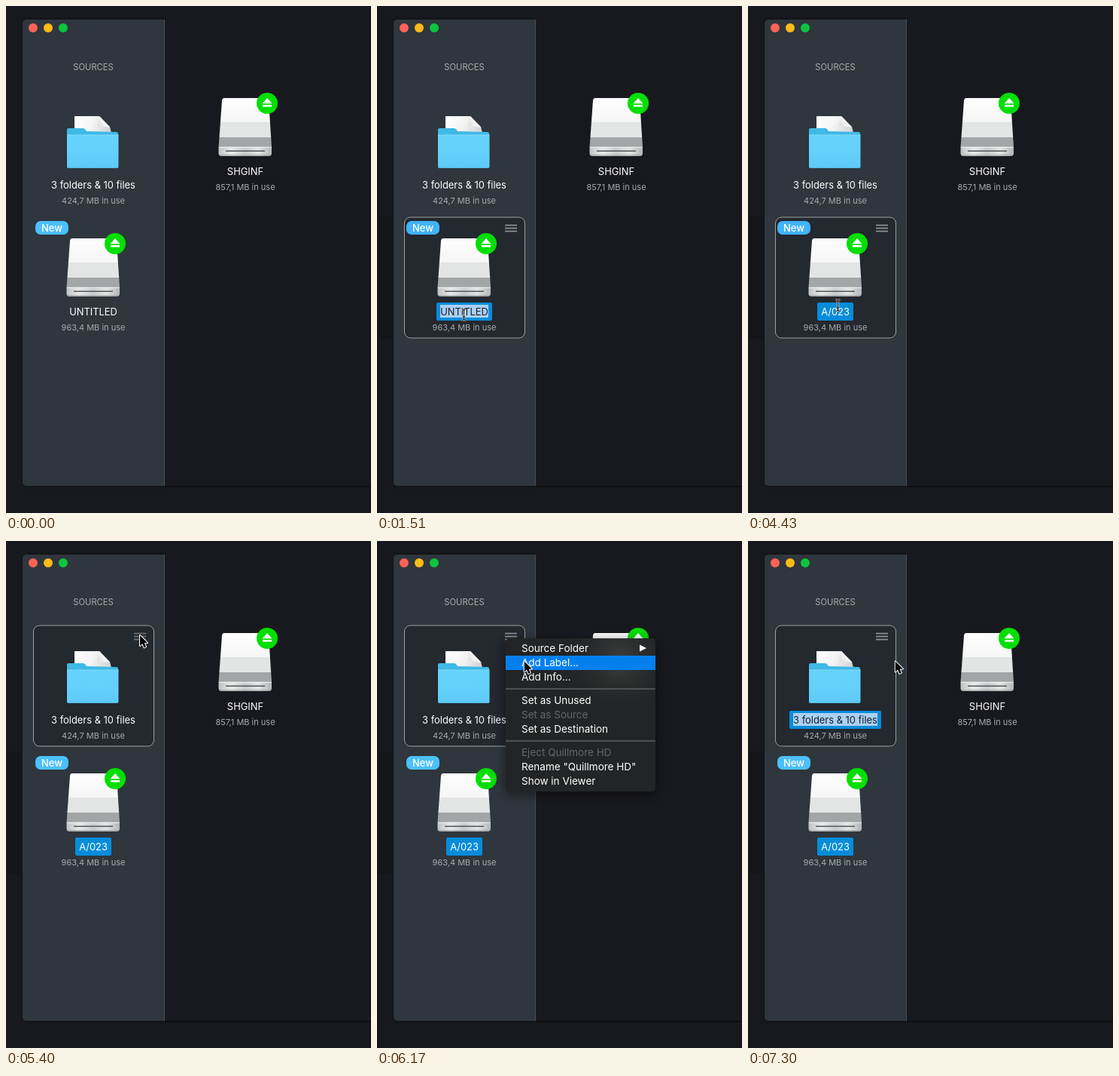
These frames come from a looping animation (485 px wide and 672 px high, 8000 ms). An HTML page with a canvas:

```html
<!DOCTYPE html>
<html lang="en">
<head>
<meta charset="utf-8">
<title>Sources</title>
<style>
  html, body { margin: 0; width: 100%; height: 100%; overflow: hidden; background: #18191e; }
  canvas { display: block; width: 485px; height: 672px; }
</style>
</head>
<body>
<canvas id="stage"></canvas>
<script>
const W = 485, H = 672, LOOP = 8000;
const canvas = document.getElementById('stage');
const c = canvas.getContext('2d');
const dpr = window.devicePixelRatio || 1;
canvas.width = W * dpr;
canvas.height = H * dpr;

const FONT = 'Inter, "Open Sans", sans-serif';
const MENU = [
  [142, 'Source Folder'], [161, 'Add Label...'], [180, 'Add Info...'],
  [211, 'Set as Unused'], [230, 'Set as Source', true], [249, 'Set as Destination'],
  [280, 'Eject Quillmore HD', true], [299, 'Rename "Quillmore HD"'], [318, 'Show in Viewer']
];

function rect(x, y, w, h, fill) {
  c.fillStyle = fill;
  c.fillRect(x, y, w, h);
}

function round(x, y, w, h, r, fill, stroke) {
  c.beginPath();
  c.roundRect(x, y, w, h, r);
  if (fill) { c.fillStyle = fill; c.fill(); }
  if (stroke) { c.strokeStyle = stroke; c.lineWidth = 1; c.stroke(); }
}

function disc(x, y, r, fill) {
  c.beginPath();
  c.arc(x, y, r, 0, Math.PI * 2);
  c.fillStyle = fill;
  c.fill();
}

function poly(points, fill) {
  c.beginPath();
  points.forEach(([x, y]) => c.lineTo(x, y));
  c.closePath();
  c.fillStyle = fill;
  c.fill();
}

function gradient(x0, y0, x1, y1, ...colors) {
  const g = c.createLinearGradient(x0, y0, x1, y1);
  colors.forEach((col, i) => g.addColorStop(i / (colors.length - 1), col));
  return g;
}

// y is the vertical middle of the capitals
function text(str, x, y, size, fill, align = 'center', weight = 400) {
  c.font = `${weight} ${size}px ${FONT}`;
  c.textAlign = align;
  c.fillStyle = fill;
  c.fillText(str, x, y + size * 0.36);
  return c.measureText(str).width;
}

function shell() {
  rect(0, 0, W, H, '#18191e');
  c.save();
  c.shadowColor = 'rgba(0,0,0,.45)';
  c.shadowBlur = 5 * dpr;
  round(22, 18, 189, 618, [5, 0, 0, 5], '#2f363d');
  c.restore();
  rect(211, 17, W - 211, 619, '#18191e');
  rect(211, 636, W - 211, 2, '#0e0f12');
  rect(210, 18, 1, 618, '#484e54');
  ['#ff6158', '#fdbc16', '#0cc53e'].forEach((col, i) => disc(36 + 20 * i, 29, 6, col));
  text('SOURCES', 116, 81, 11.2, '#a8adb1');
}

function folder() {
  poly([[91, 146], [124, 146], [138, 160], [141, 172], [91, 172]],
    gradient(91, 146, 138, 168, '#ffffff', '#f4f4f4', '#d2d2d2'));
  poly([[124, 146], [121, 158], [138, 161]], gradient(122, 158, 131, 152, '#dedede', '#fafafa'));
  c.beginPath();
  c.moveTo(81, 164);
  c.quadraticCurveTo(81, 162, 83, 162);
  c.lineTo(102, 162);
  c.quadraticCurveTo(105, 162, 107, 166);
  c.lineTo(147, 167);
  c.quadraticCurveTo(149, 167, 149, 169);
  c.lineTo(149, 180);
  c.lineTo(81, 180);
  c.fillStyle = '#3fb9e6';
  c.fill();
  round(81, 171, 68.5, 44, [0, 0, 2, 2], gradient(0, 171, 0, 215, '#66d2fc', '#64d1fb', '#5dc9f5'));
  rect(81, 170.5, 68.5, 1, '#83dcfb');
  rect(82, 214, 66, 1, '#4db5df');
}

function drive(dx, dy) {
  c.save();
  c.translate(dx, dy);
  c.save();
  c.beginPath();
  c.moveTo(88, 308);
  c.lineTo(144, 308);
  c.quadraticCurveTo(146.5, 308, 147, 311);
  c.lineTo(151, 373);
  c.lineTo(80.5, 373);
  c.lineTo(85, 311);
  c.quadraticCurveTo(85.5, 308, 88, 308);
  c.clip();
  rect(80, 307, 72, 33, gradient(0, 308, 0, 340, '#fdfdfd', '#f6f6f6'));
  rect(80, 340, 72, 20, '#e3e4e4');
  rect(80, 360, 72, 14, '#a3a6a6');
  c.restore();
  round(80.5, 372.5, 70.5, 12.5, [1, 1, 4, 4], gradient(80, 0, 151, 0, '#bfc2c3', '#e9eaea', '#c9cccd', '#e4e5e5', '#b3b6b7'));
  rect(81, 373, 69.5, 1, '#eeeeee');
  rect(90, 377.5, 52, 1.5, '#55595b');
  rect(82, 383.5, 67, 1, '#8d9192');
  disc(145, 315, 14, '#04de04');
  poly([[145, 308], [151.5, 315.3], [138.5, 315.3]], '#fff');
  rect(139, 317, 12, 2.6, '#fff');
  c.restore();
}

function card(y, dim) {
  round(36.5, y + .5, 160, 160, 8, '#24282f', '#9da1a4');
  for (let i = 0; i < 3; i++) rect(170, y + 10.2 + 4 * i, 16, 1.7, dim ? '#6b6f74' : '#8f9397');
}

// mode: plain, blue, selected or caret
function label(str, y, mode) {
  c.font = `400 12.9px ${FONT}`;
  const w = Math.round(c.measureText(str).width), x = Math.round(116 - w / 2);
  if (mode !== 'plain') round(x - 5, y - 12, w + 10, 24, 2, '#078cda');
  if (mode === 'selected') rect(x, y - 9, w, 17, '#abd0f4');
  text(str, 116, y, 12.9, mode === 'selected' ? '#16202a' : '#fff');
  if (mode === 'caret') rect(x + w, y - 8, 1, 16, '#fff');
}

function usage(str, x, y) {
  text(str, x, y, 11, '#a6abaf');
}

function menu(alpha, pointerY, lit) {
  c.save();
  c.globalAlpha = alpha;
  c.save();
  c.shadowColor = 'rgba(0,0,0,.5)';
  c.shadowBlur = 16 * dpr;
  c.shadowOffsetY = 4 * dpr;
  round(171, 129, 199, 203, 5, '#232425');
  c.restore();
  const glow = c.createRadialGradient(322, 158, 5, 322, 158, 75);
  glow.addColorStop(0, '#393c3c');
  glow.addColorStop(1, 'rgba(36,37,38,0)');
  round(171, 129, 199, 203, 5, glow);
  for (const y of [195, 264]) rect(171, y, 199, 2, '#505152');
  for (const [y, str, off] of MENU) {
    if (lit && !off && pointerY >= y - 9 && pointerY < y + 10) rect(171, y - 9, 199, 19, '#0480ee');
    text(str, 192, y, 13.5, off ? '#646566' : '#fff', 'left');
  }
  poly([[349, 137.5], [358, 142], [349, 146.5]], '#fff');
  c.restore();
}

function arrow(x, y) {
  c.save();
  c.translate(x, y);
  c.beginPath();
  [[0, 0], [0, 14], [3.2, 11], [5.5, 16.3], [8, 15.2], [5.8, 10.2], [10, 10]].forEach(p => c.lineTo(...p));
  c.closePath();
  c.lineJoin = 'round';
  c.lineWidth = 2;
  c.strokeStyle = '#fff';
  c.stroke();
  c.fillStyle = '#000';
  c.fill();
  c.restore();
}

function beam(x, y) {
  c.beginPath();
  for (const s of [-1, 1]) {
    c.moveTo(x - 3, y + 7.5 * s);
    c.quadraticCurveTo(x, y + 7.5 * s, x, y + 5 * s);
    c.quadraticCurveTo(x, y + 7.5 * s, x + 3, y + 7.5 * s);
  }
  c.moveTo(x, y - 6);
  c.lineTo(x, y + 6);
  c.moveTo(x - 2, y + 3);
  c.lineTo(x + 2, y + 3);
  c.strokeStyle = 'rgba(255,255,255,.75)';
  c.lineWidth = 2.6;
  c.stroke();
  c.strokeStyle = '#111';
  c.lineWidth = 1.1;
  c.stroke();
}

// eased travel in n even steps
function travel(t, t0, t1, n, from, to) {
  const k = Math.floor((t - t0) / (t1 - t0) * (n - 1) + 1e-6);
  const p = Math.max(0, Math.min(1, k / (n - 1)));
  const e = p * p * (3 - 2 * p);
  return from.map((v, i) => v + (to[i] - v) * e);
}

function pointer(t) {
  if (t < 500) return null;
  if (t < 1210) return travel(t, 500, 1070, 7, [3, 362], [113, 404]);
  if (t < 4430) return [115.5, 409];
  if (t < 5910) return travel(t, 4430, 5220, 10, [119.5, 397], [178, 125]);
  return travel(t, 5910, 6170, 4, [181, 131], [195.8, 159.5]);
}

function driveLabel(t) {
  if (t < 1210) return ['UNTITLED', 'plain'];
  if (t < 1510) return ['UNTITLED', 'blue'];
  if (t < 2130) return ['UNTITLED', 'selected'];
  if (t < 2610) return ['A', 'caret'];
  if (t < 3020) return ['A/', 'caret'];
  if (t < 3380) return ['A/0', 'caret'];
  if (t < 3650) return ['A/023', 'caret'];
  return ['A/023', t < 3740 ? 'selected' : 'blue'];
}

function draw(t) {
  c.setTransform(dpr, 0, 0, dpr, 0, 0);
  const pos = pointer(t);
  const inside = y => pos && pos[0] >= 36 && pos[0] < 197 && pos[1] >= y && pos[1] < y + 161;
  const hoverTop = t >= 5910 || inside(112);
  const hoverLow = t < 5910 && inside(280);

  shell();
  if (t >= 590) rect(2, 279, 20, 162, '#131519');
  if (hoverTop) card(111.5, t >= 5400 && t < 5490);
  if (hoverLow) card(279.5);

  folder();
  label('3 folders & 10 files', 237, t < 7210 ? 'plain' : t < 7300 ? 'blue' : 'selected');
  usage('424,7 MB in use', 116, 258);

  round(39, 285, 44, 18, 7, hoverLow ? '#40b3f9' : '#4bc0fb');
  text('New', 61, 294.5, 13, '#fff', 'center', 500);
  drive(0, 0);
  const [name, mode] = driveLabel(t);
  label(name, 405, mode);
  usage('963,4 MB in use', 116, 426);

  drive(202, -186);
  label('SHGINF', 0, 'plain', c.save(), c.translate(202, 219));
  c.restore();
  usage('857,1 MB in use', 318, 240);

  if (t >= 5490 && t < 7210) {
    menu(t < 7130 ? 1 : .5, pos[1], t < 6950 || t >= 7040);
  }
  if (pos) (t >= 1210 && pos[1] >= 393 ? beam : arrow)(...pos);
}

const start = performance.now();
function tick(now) {
  draw(Math.max(0, now - start) % LOOP);
  requestAnimationFrame(tick);
}
draw(0);
requestAnimationFrame(tick);
</script>
</body>
</html>
```
